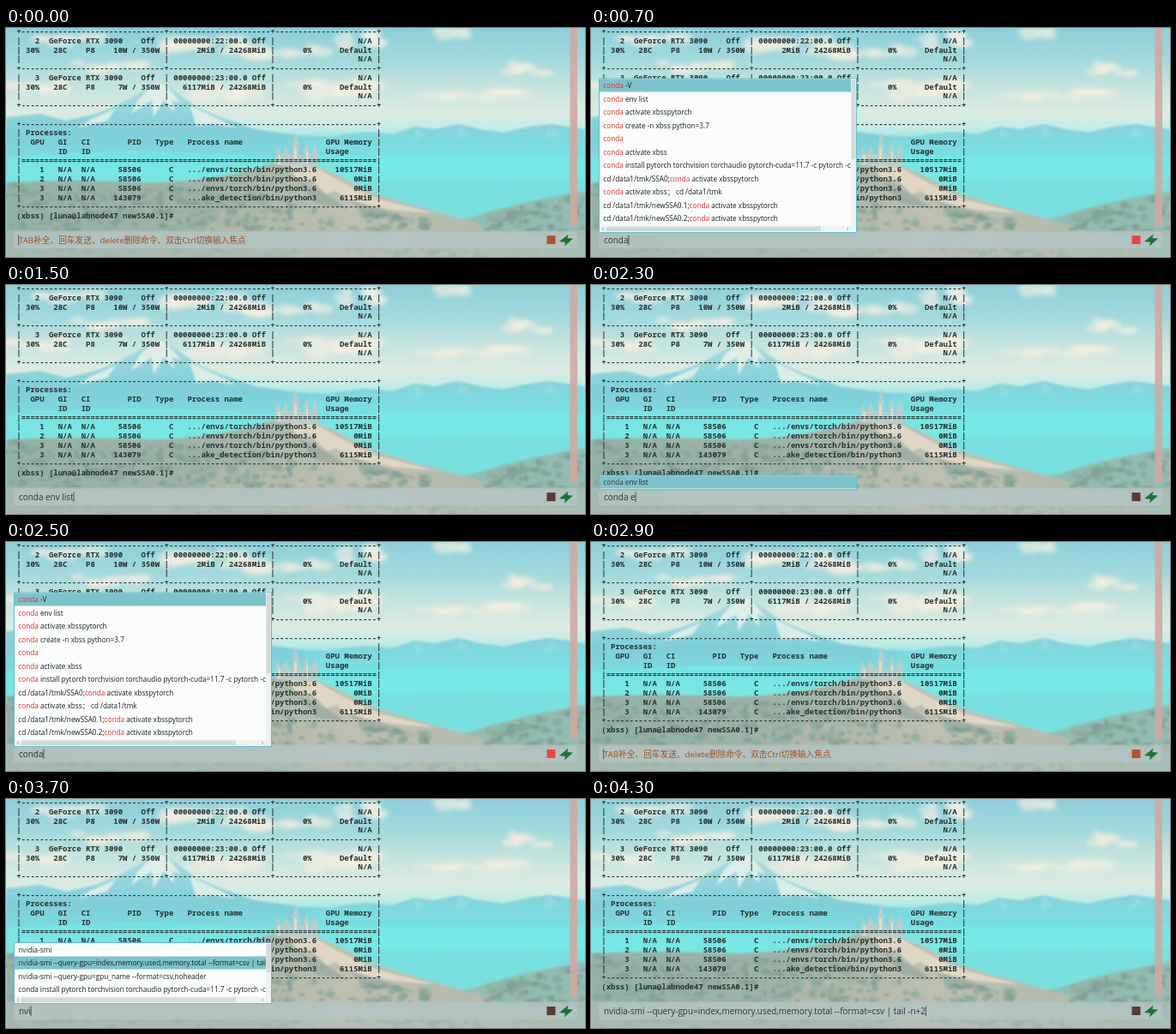
These frames come from a looping animation (675x267 px, 4400 ms). An HTML page:

```html
<!DOCTYPE html>
<html lang="zh">
<head>
<meta charset="utf-8">
<style>
  html, body { margin: 0; width: 100%; height: 100%; overflow: hidden; background: #a9dedc; }
  svg { display: block; width: 675px; height: 267px; }
  text { white-space: pre; }
  .term { font: 600 8.97px "Noto Sans Mono", "DejaVu Sans Mono", monospace; fill: #26302f; }
  .ui { font-family: "Open Sans", "Noto Sans", "Noto Sans CJK SC", "Noto Sans CJK", sans-serif; }
  .row { font-size: 8.2px; fill: #17201f; }
  .typed { font-size: 9.95px; fill: #2b3433; }
  .hint { font-size: 9.7px; fill: #a34d20; }
</style>
</head>
<body>
<svg id="stage" viewBox="0 0 675 267">
  <defs>
    <linearGradient id="sky" x2="0" y2="1">
      <stop offset="0" stop-color="#8ccfd9"/>
      <stop offset=".14" stop-color="#a2d9dc"/>
      <stop offset=".25" stop-color="#c4e3df"/>
      <stop offset=".37" stop-color="#dcebe2"/>
      <stop offset=".44" stop-color="#c4ebe6"/>
      <stop offset=".5" stop-color="#86e2e3"/>
      <stop offset=".62" stop-color="#76e8e5"/>
      <stop offset="1" stop-color="#8fdcd6"/>
    </linearGradient>
    <linearGradient id="peak" x2="0" y2="1">
      <stop offset="0" stop-color="#a9dce0"/>
      <stop offset=".5" stop-color="#7fcfd8"/>
      <stop offset="1" stop-color="#7ce3e4"/>
    </linearGradient>
    <linearGradient id="range" x2="0" y2="1">
      <stop offset="0" stop-color="#84d3dc"/>
      <stop offset="1" stop-color="#74e4e3"/>
    </linearGradient>
    <linearGradient id="slope">
      <stop offset="0" stop-color="#93b1a7"/>
      <stop offset=".42" stop-color="#a3b4a8"/>
      <stop offset=".6" stop-color="#bfc0b1"/>
      <stop offset="1" stop-color="#a9b8ab"/>
    </linearGradient>
    <filter id="soft" x="-30%" y="-30%" width="160%" height="160%"><feGaussianBlur stdDeviation="2.6"/></filter>
    <filter id="mild"><feGaussianBlur stdDeviation=".8"/></filter>
    <clipPath id="listClip"><rect x="10" y="0" width="293" height="238"/></clipPath>
  </defs>
  <rect width="675" height="267" fill="url(#sky)"/>
  <g id="clouds" filter="url(#soft)"/>
  <g filter="url(#mild)">
    <path d="M0 104 L40 100 70 108 105 100 130 90 152 78 172 66 186 66 200 76 222 92 250 104 290 118 345 126 400 128 V180 H0Z" fill="url(#peak)"/>
    <path d="M172 66 L186 66 204 88 194 84 196 98 184 84 172 104 170 84 146 100 154 84Z M214 90 L244 104 268 116 240 112 222 114Z M128 94 L118 108 84 116 100 106Z" fill="#eef4ea" opacity=".8"/>
    <path d="M350 132 L392 124 420 121 450 124 476 115 500 118 528 112 552 118 580 122 604 116 634 112 675 118 V160 H350Z" fill="url(#range)"/>
    <path d="M476 115 L488 126 478 132Z M528 112 L540 124 524 130Z M634 112 L646 124 626 130Z" fill="#a4dfe2" opacity=".4"/>
    <path d="M0 150 Q150 138 300 150 L675 148 V235 H0Z" fill="#76e8e5" opacity=".75"/>
    <path d="M390 180 Q480 172 675 176 V222 H390Z" fill="#78e0de"/>
    <path d="M430 222 L540 222 Q590 204 675 190 V267 H430Z" fill="#92bdb4"/>
    <path d="M0 180 Q80 176 170 180 Q240 178 292 164 Q320 152 346 156 Q382 166 420 190 Q470 206 545 226 L620 252 660 267 H0Z" fill="url(#slope)"/>
    <path d="M328 158 Q348 155 366 165 Q396 184 436 200 L500 216 450 212 405 203 384 190 374 194 356 176 340 178Z" fill="#e0d6c4"/>
    <path d="M340 178 L374 194 400 212 360 204Z M400 200 L446 214 480 226 420 219Z" fill="#8fa59c" opacity=".6"/>
    <path d="M250 214 Q330 204 420 226 L470 238 H230Z" fill="#bcbfae" opacity=".6"/>
  </g>
  <g fill="#bcccc8" opacity=".9">
    <path d="M314 160 V147 L317 138 320 147 H334 V137 L338 121 342 137 V148 H356 L360 134 364 148 V164Z"/>
    <path d="M323 160 V144 L326 137 329 144 V160Z M347 160 V141 L350 133 353 141 V160Z"/>
    <path d="M317 148 H320 V159 H317Z M336 139 H339 V157 H336Z M350 144 H352 V158 H350Z" fill="#e8dccd"/>
  </g>
  <g id="trees" filter="url(#mild)"/>
  <rect y="236" width="675" height="31" fill="#b2bfb7" opacity=".6"/>
  <rect x="657.5" width="8.5" height="231" fill="#d3a8a2" opacity=".9"/>
  <g id="term" class="term"></g>
  <rect x="9" y="237.5" width="657" height="19.5" rx="3" fill="#b3c5c3" opacity=".75"/>
  <rect id="stop" x="630.5" y="242" width="10" height="10"/>
  <path d="M645 249 L655.5 240.5 654.5 245 661 245.5 651 254.5 652 249.8Z" fill="#1f7233"/>
  <text id="entry" class="ui" x="15" y="251"></text>
  <rect id="caret" y="241.5" width=".9" height="11.5" fill="#38413f"/>
  <g id="popup" class="ui"></g>
</svg>
<script>
const $ = id => document.getElementById(id);

function add(parent, tag, attrs, text) {
  const node = document.createElementNS('http://www.w3.org/2000/svg', tag);
  for (const k in attrs) node.setAttribute(k, attrs[k]);
  if (text !== undefined) node.textContent = text;
  parent.appendChild(node);
  return node;
}

let seed = 11;
const rnd = () => (seed = seed * 16807 % 2147483647) / 2147483647;

// Scenery: each bank is centre x, centre y, half width, half height
const banks = [
  [40, 68, 50, 10], [70, 14, 50, 10], [125, 46, 55, 9], [235, 18, 60, 16],
  [250, 72, 60, 16], [330, 30, 60, 12], [375, 74, 80, 16], [418, 14, 36, 14],
  [528, 6, 34, 8], [604, 48, 36, 10], [545, 78, 90, 8]
];
for (const [x, y, w, h] of banks) {
  for (let i = 0; i < 10; i++) {
    add($('clouds'), 'ellipse', {
      cx: x + (rnd() * 2 - 1) * w * .75, cy: y + (rnd() * 2 - 1) * h * .6,
      rx: w * (.15 + rnd() * .2), ry: h * (.25 + rnd() * .3),
      fill: rnd() < .75 ? '#f6efdf' : '#e3ece3', opacity: .6
    });
  }
}

const greens = ['#7fa095', '#8dad9f', '#75968d', '#9ab3a5', '#84a193'];
function plant(count, x0, x1, top, bottom) {
  for (let i = 0; i < count; i++) {
    const x = x0 + rnd() * (x1 - x0), y0 = top(x);
    add($('trees'), 'ellipse', {
      cx: x, cy: y0 + rnd() * (bottom - y0), rx: 2 + rnd() * 5, ry: 1.5 + rnd() * 3,
      fill: greens[Math.floor(rnd() * greens.length)], opacity: .55
    });
  }
}
plant(300, 0, 330, x => 182 + 4 * Math.sin(x / 45) + x * .04, 236);
plant(50, 330, 500, x => 204 + (x - 330) * .12, 238);
plant(100, 560, 675, x => 220 - (x - 560) * .24, 242);
plant(60, 0, 675, () => 257, 267);

// Terminal
const bar = '+' + '-'.repeat(31) + '+' + ('-'.repeat(22) + '+').repeat(2);
const wide = '+' + '-'.repeat(77) + '+';
const cells = (a, b, c) => `|${a.padEnd(31)}|${b.padStart(21)} |${c.padStart(21)} |`;
const gpu = (id, bus, watts, used) => [
  cells(`   ${id}  GeForce RTX 3090    Off`, `00000000:${bus}:00.0 Off`, 'N/A'),
  cells(` 30%   28C    P8   ${watts.padStart(4)} / 350W`, `${used} / 24268MiB`, '0%      Default'),
  cells('', '', 'N/A'), bar
];
const proc = (id, pid, name, mem) =>
  `|    ${id}   N/A  N/A ${pid.padStart(9)}      C   ${name}${mem.padStart(12)} |`;
const py = '.../envs/torch/bin/python3.6';
const lines = [
  bar, ...gpu(2, '22', '10W', '2MiB'), ...gpu(3, '23', '7W', '6117MiB'), '', wide,
  '| Processes:'.padEnd(78) + '|',
  '|  GPU   GI   CI        PID   Type   Process name                  GPU Memory |',
  '|        ID   ID' + ' '.repeat(51) + 'Usage      |',
  '|' + '='.repeat(77) + '|',
  proc(1, '58506', py, '10517MiB'), proc(2, '58506', py, '0MiB'), proc(3, '58506', py, '0MiB'),
  proc(3, '143079', '...ake_detection/bin/python3', '6115MiB'), wide,
  '(xbss) [luna@labnode47 newSSA0.1]#'
];
lines.forEach((s, i) => add($('term'), 'text', { x: 12.3, y: 7.2 + i * 10.75 }, s));

// Completion
const install = 'conda install pytorch torchvision torchaudio pytorch-cuda=11.7 -c pytorch -c nvidia';
const query = 'nvidia-smi --query-gpu=index,memory.used,memory.total --format=csv | tail -n+2';
const history = {
  c: ['conda -V', 'conda env list', 'conda activate xbsspytorch', 'conda create -n xbss python=3.7',
    'conda', 'conda activate xbss', install, 'cd /data1/tmk/SSA0;conda activate xbsspytorch',
    'conda activate xbss； cd /data1/tmk', 'cd /data1/tmk/newSSA0.1;conda activate xbsspytorch',
    'cd /data1/tmk/newSSA0.2;conda activate xbsspytorch'],
  n: ['nvidia-smi', query, 'nvidia-smi --query-gpu=gpu_name --format=csv,noheader', install]
};

// Each step: start time, entry text, selected row (-1 hides the list)
const env = 'conda env list';
const steps = [[0, '', -1]];
const type = (word, from, to, start) => {
  for (let n = from, t = start; n !== to; t += 100) {
    n += Math.sign(to - from);
    steps.push([t, word.slice(0, n), 0]);
  }
};
type(env, 0, 4, 100);
steps.push([700, 'conda', 0], [900, 'conda', 1], [1200, env, -1]);
type(env, 14, 7, 1600);
type(env, 7, 4, 2400);
steps.push([2800, 'co', 0], [2900, '', -1]);
type(query, 0, 3, 3200);
steps.push([3700, 'nvi', 1], [4000, query, -1]);

function drawList(typed, sel) {
  const box = $('popup');
  box.replaceChildren();
  if (sel < 0) return 0;
  const rows = history[typed[0]].filter(s => s.includes(typed));
  const pitch = 15.5, long = rows.includes(install);
  const height = rows.length * pitch + (long ? 10 : 2);
  const top = 239 - height;
  add(box, 'rect', { x: 9.5, y: top + .5, width: 300, height: height - 1, fill: '#fbfdfc', stroke: '#62bccd' });
  add(box, 'rect', { x: 10, y: top + 1 + sel * pitch, width: long ? 293 : 299, height: pitch - .5, fill: '#7dc3cb' });
  const list = add(box, 'g', { 'clip-path': 'url(#listClip)' });
  const accent = rows.length > 4 ? '#e02f2a' : '#4c302c';
  rows.forEach((s, i) => {
    const at = s.indexOf(typed);
    const line = add(list, 'text', { class: 'row', x: 14.3, y: top + 11.8 + i * pitch });
    add(line, 'tspan', {}, s.slice(0, at));
    add(line, 'tspan', { fill: accent }, typed);
    add(line, 'tspan', {}, s.slice(at + typed.length));
  });
  if (long) {
    add(box, 'rect', { x: 303, y: top + 1, width: 6, height: height - 2, fill: '#eef2f1' });
    add(box, 'rect', { x: 303.5, y: top + 2, width: 5, height: (height - 12) * .55, fill: '#d3dad9' });
    add(box, 'rect', { x: 10, y: 230.5, width: 293, height: 7.5, fill: '#eef2f1' });
    add(box, 'rect', { x: 18, y: 231.5, width: 250, height: 5.5, fill: '#d3dad9' });
    add(box, 'path', { d: 'M15 232.5 l-2 1.8 2 1.8 M298 232.5 l2 1.8 -2 1.8', fill: 'none', stroke: '#8b9493', 'stroke-width': .8 });
  }
  return rows.length;
}

let shown;
function render(t) {
  const step = steps.filter(s => s[0] <= t).pop();
  if (step === shown) return;
  shown = step;
  const [, typed, sel] = step, entry = $('entry');
  entry.setAttribute('class', 'ui ' + (typed ? 'typed' : 'hint'));
  entry.textContent = typed || 'TAB补全、回车发送、delete删除命令、双击Ctrl切换输入焦点';
  $('caret').setAttribute('x', typed ? 15 + entry.getComputedTextLength() : 14.3);
  const count = drawList(typed, sel);
  $('stop').setAttribute('fill', !typed ? '#b5532b' : count > 4 ? '#ee4440' : '#5b3936');
}

const begin = performance.now();
function tick() {
  render((performance.now() - begin) % 4400);
  requestAnimationFrame(tick);
}
tick();
</script>
</body>
</html>
```
